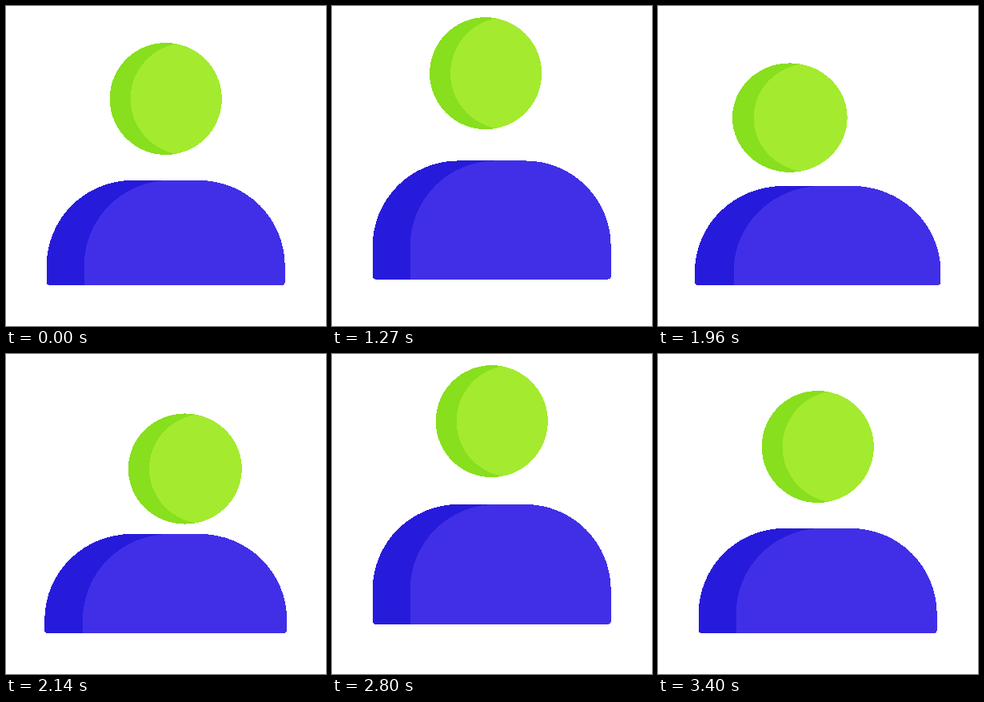
These frames come from a looping animation (400 by 400 pixels, 3.43 s). An HTML page:

```html
<!DOCTYPE html>
<html lang="en">
<head>
<meta charset="utf-8">
<title>Bouncing avatar</title>
<style>
  html, body { margin: 0; width: 100%; height: 100%; overflow: hidden; background: #fff; }
  svg { display: block; width: 100%; height: 100%; shape-rendering: crispEdges; }
</style>
</head>
<body>
<svg viewBox="0 0 400 400">
  <g id="body">
    <path id="shade" fill="#271bdb"/>
    <path id="light" fill="#412fe8"/>
  </g>
  <g id="head">
    <circle r="70" fill="#87df1d"/>
    <path d="M13 -68.8A70 70 0 0 1 13 68.8A70 70 0 0 1 13 -68.8" fill="#a4ea2f"/>
  </g>
</svg>
<script>
const LOOP = 3430;
const $ = id => document.getElementById(id);

const smooth = u => u * u * (3 - 2 * u);
const progress = (t, from, to) => Math.min(1, Math.max(0, (t - from) / (to - from)));
const ramp = (t, from, to) => smooth(progress(t, from, to));
const pulse = (t, from, peak, to) => ramp(t, from, peak) - ramp(t, peak, to);

// Rounded shoulders starting at x; only the outer shape rounds its left corner.
function shoulders(x, top, bottom, corner) {
  const side = top + 107;
  return `M${x} ${side}A107 107 0 0 1 ${x + 107} ${top}H242A107 107 0 0 1 349 ${side}` +
    `V${bottom - 4}q0 4 -4 4H${x + corner}q${-corner} 0 ${-corner} ${-corner}z`;
}

function draw(t) {
  // Hop to the left, swing to the right, then leap back to the centre.
  const swing = smooth(progress(t, 1690, 2260) ** 1.8);
  const side = 2 * swing - ramp(t, 1190, 1530) - ramp(t, 2510, 2720);
  const dip = 17 * 4 * swing * (1 - swing);
  const squash = pulse(t, 1700, 2015, 2260);

  const crouch = ramp(t, 1190, 1520) - ramp(t, 2510, 2640);
  const hop = pulse(t, 1000, 1190, 1520);
  const leap = pulse(t, 2510, 2640, 3330);
  const headX = 199.7 + 53 * side;
  const headY = 116 + 14 * crouch - 40 * hop - 37 * leap + dip;

  const sink = ramp(t, 1195, 1510) - ramp(t, 2510, 2670);
  const top = 218 + 7 * sink - 30 * pulse(t, 1000, 1195, 1510) - 33 * pulse(t, 2510, 2670, 3380);
  const bottom = 349 - 8 * pulse(t, 1040, 1230, 1480) - 11.3 * pulse(t, 2530, 2780, 3400);

  $('head').setAttribute('transform',
    `translate(${headX} ${headY}) scale(${1 + 0.028 * squash} ${1 - 0.028 * squash})`);
  $('body').setAttribute('transform',
    `translate(199.7 0) scale(${1 + 0.034 * squash} 1) translate(-200 0)`);
  $('shade').setAttribute('d', shoulders(51, top, bottom, 4));
  $('light').setAttribute('d', shoulders(98, top, bottom, 0));
}

const start = performance.now();
function tick() {
  draw((performance.now() - start) % LOOP);
  requestAnimationFrame(tick);
}
tick();
</script>
</body>
</html>
```
